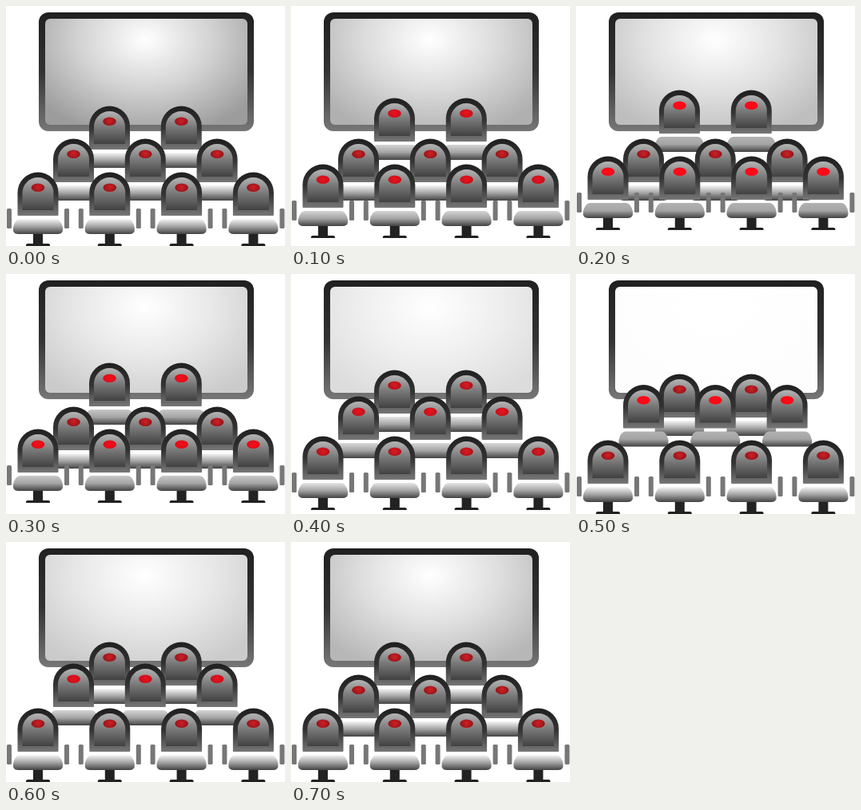
These frames come from a looping animation (349x301 px, 800 ms). An HTML page with a canvas:

```html
<!DOCTYPE html>
<html lang="en">
<head>
<meta charset="utf-8">
<title>Cinema seats</title>
<style>
html, body { margin: 0; width: 100%; height: 100%; overflow: hidden; background: #fff; }
canvas { display: block; }
</style>
</head>
<body>
<canvas id="stage" width="349" height="301"></canvas>
<script>
const ctx = document.getElementById('stage').getContext('2d');
const STEP = 100;
const outerLift = [0, 10, 20, 14, 5, 0, 0, 0];
const middleLift = [0, 0, 0, 0, 13, 27.5, 14, 0];
const screenEdge = [156, 176, 190, 203, 220, 253, 203, 183];

const gray = v => `rgb(${v},${v},${v})`;
const mix = (a, b, k) => Math.round(a + (b - a) * k);

function shade(gradient, colors) {
  colors.forEach((c, i) => gradient.addColorStop(i / (colors.length - 1), c));
  return gradient;
}

const vertical = (y0, y1, ...colors) => shade(ctx.createLinearGradient(0, y0, 0, y1), colors);

function box(x, y, w, h, r, fill) {
  ctx.fillStyle = fill;
  ctx.beginPath();
  ctx.roundRect(x, y, w, h, r);
  ctx.fill();
}

function drawScreen(edge) {
  box(41, 8, 269, 149, 12, vertical(8, 157, '#202020', '#333', '#777'));

  // The glow is a wide ellipse
  const light = ctx.createRadialGradient(0, 0, 0, 0, 0, 125);
  shade(light, ['#fff', gray(mix(255, edge, 0.45)), gray(edge)]);
  ctx.save();
  ctx.beginPath();
  ctx.roundRect(49, 16, 253, 133, 6);
  ctx.clip();
  ctx.translate(174, 42);
  ctx.scale(1.35, 1);
  ctx.fillStyle = light;
  ctx.fillRect(-125, -30, 250, 140);
  ctx.restore();
}

function drawSeat(x, y, glow, full) {
  ctx.save();
  ctx.translate(x, y);
  if (full) {
    box(-6, 76, 12, 14, 0, '#222');
    box(-15, 89, 30, 3, [2, 2, 0, 0], '#222');
    for (const side of [-39, 33]) box(side, 45, 6, 25, 1.5, '#777');
  }
  box(-14, 53, 28, 7, 0, '#fff');

  // Cushion
  ctx.fillStyle = vertical(57, 78, gray(mix(255, 180, glow)), '#a4a4a4', '#383838');
  ctx.beginPath();
  ctx.moveTo(-23, 58);
  ctx.lineTo(23, 58);
  ctx.quadraticCurveTo(29, 59, 31, 69);
  ctx.quadraticCurveTo(32, 77, 25, 77);
  ctx.lineTo(-25, 77);
  ctx.quadraticCurveTo(-32, 77, -31, 69);
  ctx.quadraticCurveTo(-29, 59, -23, 58);
  ctx.fill();

  // Backrest and its panel
  box(-25.5, -0.5, 51, 54.5, [25.5, 25.5, 1, 1], vertical(0, 54, '#202020', '#333', '#777'));
  box(-19.5, 6, 39, 41, [19.5, 19.5, 0, 0], vertical(6, 47, '#b4b4b4', '#777', '#414141'));

  const red = ctx.createRadialGradient(0, 18, 0, 0, 18, 8);
  shade(red, [
    `rgb(${mix(205, 255, glow)},${mix(32, 8, glow)},${mix(38, 24, glow)})`,
    `rgb(${mix(150, 255, glow)},${mix(20, 8, glow)},${mix(25, 24, glow)})`
  ]);
  ctx.fillStyle = red;
  ctx.beginPath();
  ctx.ellipse(0, 18.7, 8.3, 5.2, 0, 0, 2 * Math.PI);
  ctx.fill();
  ctx.restore();
}

function drawRow(first, count, top, lift, peak, full) {
  for (let i = 0; i < count; i++) drawSeat(first + i * 89.8, top - lift, lift / peak, full);
}

function draw(now) {
  const i = Math.floor(now / STEP) % 8;
  ctx.fillStyle = '#fff';
  ctx.fillRect(0, 0, 349, 301);
  drawScreen(screenEdge[i]);
  drawRow(129.5, 2, 126, outerLift[i], 20);
  drawRow(84.5, 3, 167, middleLift[i], 27.5);
  drawRow(40, 4, 209, outerLift[i], 20, true);
}

const start = performance.now();
function tick() {
  draw(performance.now() - start);
  requestAnimationFrame(tick);
}
tick();
</script>
</body>
</html>
```
